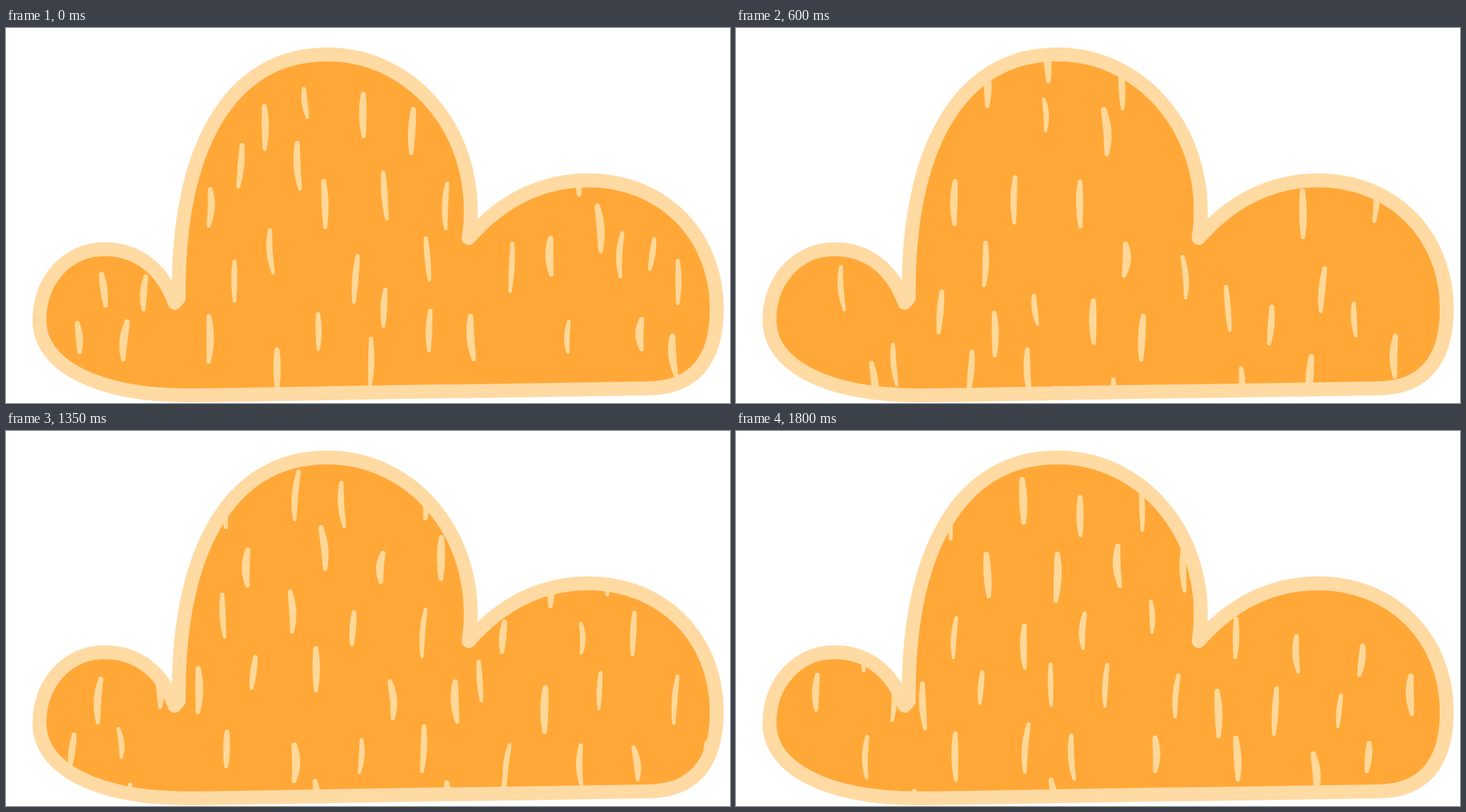
An HTML page with a canvas for the animation above (1830 ms loop, 1039 by 539 pixels).

```html
<!DOCTYPE html>
<html lang="en">
<head>
<meta charset="utf-8">
<title>Cloud rain</title>
<style>
  html, body { margin: 0; width: 100%; height: 100%; overflow: hidden; background: #fff; }
  canvas { display: block; }
</style>
</head>
<body>
<canvas id="stage" width="1039" height="539"></canvas>
<script>
const ctx = document.getElementById('stage').getContext('2d');
const LOOP = 1830, STEP = 30;
const FILL = '#ffa838', EDGE = '#ffdaa3', DASH = '#ffd898';

const cloud = new Path2D(
  'M242 395 C224 345 188 318 141 318 C88 318 48 362 48 420' +
  'C48 485 130 528 262 528 C420 527 560 522 665 522 L920 518' +
  'C985 518 1020 480 1020 404 C1020 297 942 219 836 219' +
  'C770 219 712 247 664 302 C685 160 590 38 461 38' +
  'C318 38 245 178 248 388 Z');

// Dash centres at the start of the loop
const opening = [
  [430, 108], [513, 125], [371, 143], [583, 148], [336, 198], [420, 198], [457, 253],
  [544, 241], [632, 256], [292, 258], [381, 321], [328, 364], [502, 361], [605, 332],
  [543, 402], [448, 436], [291, 447], [389, 491], [523, 480], [608, 435], [669, 445],
  [807, 444], [725, 344], [782, 328], [851, 288], [883, 326], [927, 325], [964, 365],
  [824, 207], [912, 440], [959, 471], [140, 376], [199, 381], [104, 445], [171, 449]
];
const second = [
  [443, -172], [530, -148], [314, -46], [400, -50], [494, -44], [357, 42], [558, 36],
  [643, 61], [293, 111], [706, 106], [767, 130], [725, 220], [842, 79], [888, 122],
  [946, 175], [197, 216], [138, 254], [153, 77], [237, 63], [228, 187]
];

let seed = 7;
function rnd() {
  seed = (seed * 16807) % 2147483647;
  return seed / 2147483647;
}
const spread = r => (rnd() * 2 - 1) * r;

function makeDash([x, y]) {
  return { x, y, len: 60 + spread(14), lean: spread(6), bow: spread(3), w: 10 + spread(2) };
}

// Staggered columns, filled from the bottom up
function scatter(range, gap) {
  const dashes = [];
  for (let x = 82, odd = false; x < 1010; x += 46, odd = !odd) {
    const [low, high] = range(x > 235 && x < 680);
    for (let y = low - (odd ? gap / 2 : 0); y > high; y -= gap) {
      dashes.push(makeDash([x + spread(14), y + spread(24)]));
    }
  }
  return dashes;
}

const early = [
  ...[...opening, ...second].map(makeDash),
  ...scatter(mid => mid ? [-225, -375] : [-40, -270], 190)
];
const late = scatter(mid => mid ? [365, -320] : [470, -120], 175);

function drawDash({ x, y, len, lean, bow, w }, dy) {
  y += dy;
  const top = y - len / 2, end = y + len / 2;
  if (end < 20 || top > 530) return;
  const xt = x - lean / 2, xb = x + lean / 2, xm = x + bow * 2;
  const a = w * 0.34, b = w * 0.28, c = w * 0.68;
  ctx.beginPath();
  ctx.moveTo(xt - a, top + a);
  ctx.quadraticCurveTo(xm - c, y, xb - b, end - b);
  ctx.bezierCurveTo(xb - b, end + b * 0.4, xb + b, end + b * 0.4, xb + b, end - b);
  ctx.quadraticCurveTo(xm + c, y, xt + a, top + a);
  ctx.bezierCurveTo(xt + a, top - a * 0.4, xt - a, top - a * 0.4, xt - a, top + a);
  ctx.fill();
}

function draw(t) {
  // The first shower speeds up halfway; the second falls evenly.
  const fall = 0.495 * Math.min(t, 900) + 0.729 * Math.max(t - 900, 0);
  const lateFall = 0.807 * (t - 1350);
  ctx.fillStyle = '#fff';
  ctx.fillRect(0, 0, 1039, 539);
  ctx.fillStyle = FILL;
  ctx.fill(cloud);
  ctx.save();
  ctx.clip(cloud);
  ctx.fillStyle = DASH;
  early.forEach(d => drawDash(d, fall));
  late.forEach(d => drawDash(d, lateFall));
  ctx.restore();
  ctx.strokeStyle = EDGE;
  ctx.lineWidth = 20;
  ctx.lineJoin = 'round';
  ctx.stroke(cloud);
}

const start = performance.now();
function tick() {
  const t = (performance.now() - start) % LOOP;
  draw(Math.floor(t / STEP) * STEP);
  requestAnimationFrame(tick);
}
tick();
</script>
</body>
</html>
```
